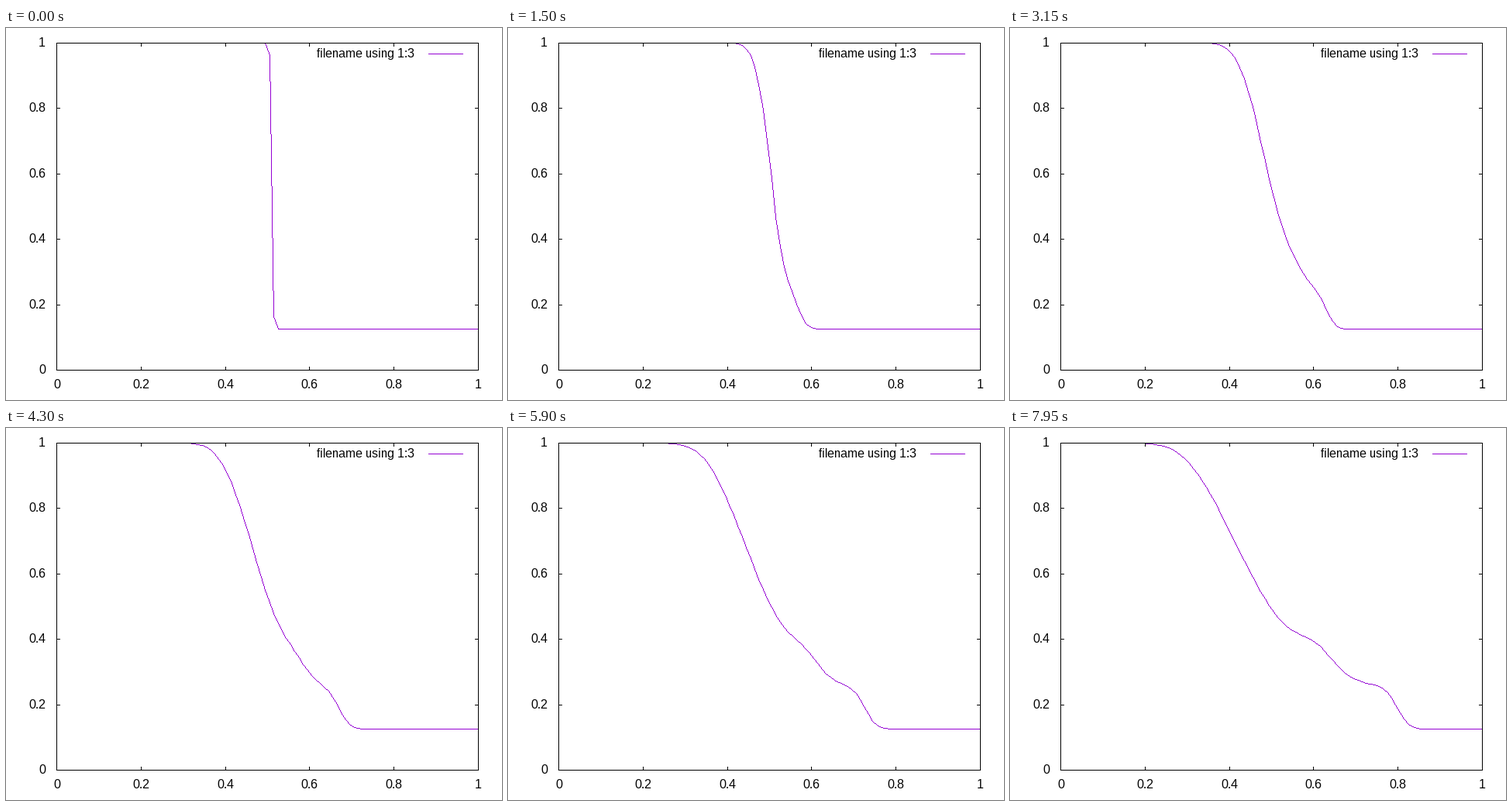
A matplotlib script that plays this animation: 640x480 px, repeating every 8 s.

```python
import numpy as np
import matplotlib.pyplot as plt
from matplotlib.animation import FuncAnimation

W, H, DPI = 640, 480, 100
LEFT, RIGHT, TOP, BOTTOM = 65, 609, 19, 441
FRAMES, INTERVAL = 160, 50
GAMMA, DX, DT = 1.4, 0.01, 0.001
PURPLE, BLACK = (148, 0, 211), (0, 0, 0)
TICK = 4

plt.rcParams.update({
    "font.family": "Liberation Sans",
    "text.hinting": "default",
    "text.hinting_factor": 1,
})


# ---- shock tube: first-order Steger-Warming flux splitting ----

def split_flux(q, pick):
    """Part of the Euler flux carried by the wave speeds kept by pick."""
    rho, mom, energy = q
    u = mom / rho
    p = (GAMMA - 1) * (energy - 0.5 * mom * u)
    c = np.sqrt(GAMMA * p / rho)
    a, b, d = pick(u, 0), pick(u + c, 0), pick(u - c, 0)
    heat = (3 - GAMMA) * (b + d) * c**2 / (2 * (GAMMA - 1))
    g = 2 * (GAMMA - 1)
    return rho / (2 * GAMMA) * np.array([
        g * a + b + d,
        g * a * u + b * (u + c) + d * (u - c),
        0.5 * (g * a * u**2 + b * (u + c)**2 + d * (u - c)**2) + heat,
    ])


def simulate(steps):
    x = (np.arange(102) - 0.5) * DX
    high = x < 0.51
    rho = np.where(high, 1.0, 0.125)
    p = np.where(high, 1.0, 0.1)
    q = np.array([rho, 0 * rho, p / (GAMMA - 1)])
    history = []
    for _ in range(steps):
        right = split_flux(q, np.maximum)
        left = split_flux(q, np.minimum)
        flux = right[:, :-1] + left[:, 1:]
        q[:, 1:-1] -= DT / DX * np.diff(flux, axis=1)
        history.append(q[0].copy())
    return x, history


# ---- one-pixel line drawing ----

def to_px(v):
    return np.floor(np.asarray(v) + 0.5).astype(int)


def map_x(x):
    return to_px(LEFT + (RIGHT - LEFT) * x)


def map_y(y):
    return to_px(BOTTOM - (BOTTOM - TOP) * y)


def segment(img, x0, y0, x1, y1, color):
    n = max(abs(x1 - x0), abs(y1 - y0)) + 1
    xs = to_px(np.linspace(x0, x1, n))
    ys = to_px(np.linspace(y0, y1, n))
    keep = (xs >= LEFT) & (xs <= RIGHT)
    img[ys[keep], xs[keep]] = color


def draw_border(img):
    img[[TOP, BOTTOM], LEFT:RIGHT + 1] = BLACK
    img[TOP:BOTTOM + 1, [LEFT, RIGHT]] = BLACK
    for v in np.arange(1, 5) / 5:
        tx, ty = map_x(v), map_y(v)
        img[TOP:TOP + TICK + 1, tx] = BLACK
        img[BOTTOM - TICK:BOTTOM + 1, tx] = BLACK
        img[ty, LEFT:LEFT + TICK + 1] = BLACK
        img[ty, RIGHT - TICK:RIGHT + 1] = BLACK


def render(rho):
    img = np.full((H, W, 3), 255, np.uint8)
    segment(img, 545, 33, 589, 33, PURPLE)
    ys = map_y(rho)
    for i in range(len(px) - 1):
        segment(img, px[i], ys[i], px[i + 1], ys[i + 1], PURPLE)
    draw_border(img)
    return img


x, history = simulate(FRAMES)
px = map_x(x)

fig = plt.figure(figsize=(W / DPI, H / DPI), dpi=DPI, facecolor="white")
ax = fig.add_axes([0, 0, 1, 1])
ax.axis("off")
picture = ax.imshow(render(history[0]), extent=(0, W, H, 0),
                    interpolation="nearest", aspect="auto")


def label(tx, ty, text):
    ax.text(tx, ty, text, ha="left", va="baseline", color="black",
            fontsize=16 * 72 / DPI)


def advance(number):
    return sum(4 if ch == "." else 9 for ch in number)


for v in np.arange(6) / 5:
    text = f"{v:g}"
    label(map_x(v) - advance(text) // 2, 465, text)
    label(51 - advance(text), map_y(v) + 5, text)
label(401, 38, "filename using 1:3")


def update(frame):
    picture.set_data(render(history[frame]))
    return [picture]


anim = FuncAnimation(fig, update, frames=FRAMES, interval=INTERVAL,
                     repeat=True, repeat_delay=0, blit=False)
plt.show()
```
